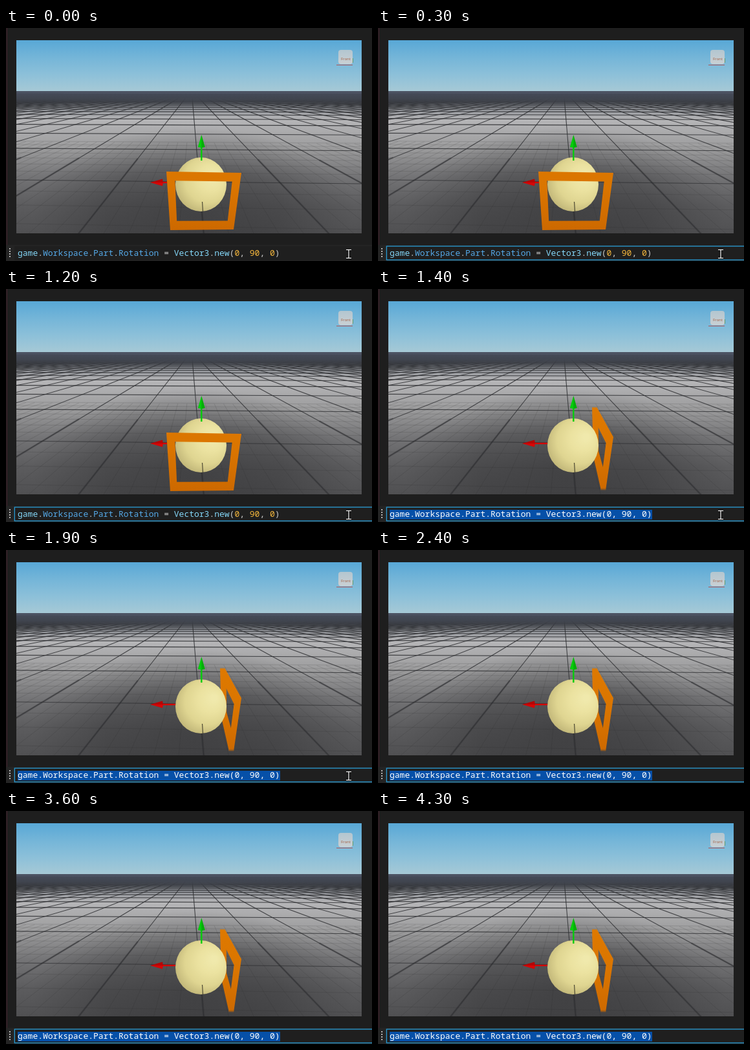
An HTML page with a canvas that plays this animation: 566x362 px, repeating every 4400 ms.

```html
<!DOCTYPE html>
<html>
<head>
<meta charset="utf-8">
<style>
html, body { margin: 0; width: 100%; height: 100%; overflow: hidden; background: #1e1e1e; }
canvas { display: block; }
</style>
</head>
<body>
<canvas id="stage" width="566" height="362"></canvas>
<script>
const LOOP = 4400, FOCUS_AT = 300, RUN_AT = 1300, POINTER_GONE_AT = 2000;
const VIEW = { left: 16, top: 19, width: 534, height: 300 };
const HORIZON = 98, BOTTOM = VIEW.top + VIEW.height;
const ctx = document.getElementById('stage').getContext('2d');

function fill(style, x, y, w, h) {
  ctx.fillStyle = style;
  ctx.fillRect(x, y, w, h);
}

function trace(points) {
  ctx.beginPath();
  points.forEach(([x, y]) => ctx.lineTo(x, y));
}

function poly(style, ...points) {
  trace(points);
  ctx.fillStyle = style;
  ctx.fill();
}

function line(style, width, ...points) {
  trace(points);
  ctx.strokeStyle = style;
  ctx.lineWidth = width;
  ctx.stroke();
}

// Colour stops are spread evenly
function blend(gradient, colors) {
  colors.forEach((color, i) => gradient.addColorStop(i / (colors.length - 1), color));
  return gradient;
}

function vertical(top, bottom, ...colors) {
  return blend(ctx.createLinearGradient(0, top, 0, bottom), colors);
}

function band(top, bottom, ...colors) {
  fill(vertical(top, bottom, ...colors), VIEW.left, top, VIEW.width, bottom - top);
}

// Camera one unit above the ground, tilted down and turned slightly left
const FOCAL = 214, PITCH = Math.atan(72 / FOCAL), YAW = 0.0178;
const CELL = 0.918, GRID_X = 0.095, GRID_Z = 1.341, SUBDIVISIONS = 5;

function project(x, z) {
  const side = x * Math.cos(YAW) + z * Math.sin(YAW);
  const ahead = z * Math.cos(YAW) - x * Math.sin(YAW);
  const depth = ahead * Math.cos(PITCH) + Math.sin(PITCH);
  const down = Math.cos(PITCH) - ahead * Math.sin(PITCH);
  return [283 + FOCAL * side / depth, 169 + FOCAL * down / depth];
}

function gridAcross(z, style, width) {
  const reach = z * 1.6 + 1.5;
  line(style, width, project(-reach, z), project(reach, z));
}

function gridAlong(x, far, style, width) {
  const near = Math.max(0.35, Math.abs(x) * 0.5);
  if (near < far) line(style, width, project(x, near), project(x, far));
}

function drawGround() {
  band(HORIZON, BOTTOM, '#545b66', '#b6b6b8', '#9c9c9d', '#747476', '#5c5c5e', '#505052');

  ctx.save();
  ctx.translate(290, 280);
  ctx.scale(2, 1);
  const shadow = ctx.createRadialGradient(0, 0, 10, 0, 0, 125);
  fill(blend(shadow, ['rgba(48,48,50,.55)', 'rgba(48,48,50,.4)', 'rgba(48,48,50,0)']), -140, -125, 280, 250);
  ctx.restore();

  const major = vertical(150, BOTTOM, 'rgba(40,41,44,.85)', 'rgba(40,41,44,.6)', 'rgba(40,41,44,.4)');
  const minor = 'rgba(35,35,37,.15)';
  for (let i = -25; i <= 25; i++) {
    const offset = i * CELL / SUBDIVISIONS;
    gridAlong(GRID_X + offset, 2.6, minor, 1);
    if (offset > -0.8 && offset < 1.3) gridAcross(GRID_Z + offset, minor, 1);
  }
  for (let i = -60; i <= 60; i++) {
    const x = GRID_X + i * CELL;
    gridAlong(x, 1.9, 'rgba(40,41,44,.3)', 3);
    gridAlong(x, 45, major, 1.1);
  }
  for (let i = 0; i < 45; i++) gridAcross(GRID_Z + i * CELL, major, 1.1);

  band(HORIZON, HORIZON + 24, 'rgba(74,81,98,.9)', 'rgba(74,80,93,.7)', 'rgba(80,84,92,0)');
}

function drawViewCube() {
  line('#ad5557', 1, [511, 57.5], [536, 57.5]);
  line('#5d9c72', 1, [536.5, 47], [536.5, 54]);
  ctx.fillStyle = vertical(34, 57, '#b3c6d0', '#cbd0d3');
  ctx.beginPath();
  ctx.roundRect(514, 34, 22, 22, 4);
  ctx.fill();
  ctx.font = '6px "Noto Sans", sans-serif';
  ctx.fillStyle = '#a5654a';
  ctx.fillText('Front', 518, 50);
}

function drawSphere() {
  const shade = ctx.createRadialGradient(322, 230, 4, 308, 238, 52);
  ctx.fillStyle = blend(shade, ['#f0e9ac', '#ebe2a0', '#dfd591', '#bdb275']);
  ctx.beginPath();
  ctx.ellipse(301.5, 243, 39.5, 42, 0, 0, 7);
  ctx.fill();
  line('#4d4933', 1.2, [303.5, 270], [304.5, 285]);
}

function mix(a, b, amount) {
  return a.map((value, i) => value + (b[i] - value) * amount);
}

// Four bars around a hole, swept sideways by the given thickness
function drawFrame([topLeft, topRight, bottomRight, bottomLeft], insetX, insetY, thickness) {
  const at = (u, v) => mix(mix(topLeft, topRight, u), mix(bottomLeft, bottomRight, u), v);
  const ring = (u, v) => [at(u, v), at(1 - u, v), at(1 - u, 1 - v), at(u, 1 - v)];
  const outer = ring(0, 0), inner = ring(insetX, insetY);
  ctx.fillStyle = vertical(183, 313, '#de7900', '#da7500', '#cd6900');
  for (let shift = 0; shift <= thickness; shift++) {
    ctx.beginPath();
    for (const corners of [outer, inner]) {
      corners.forEach(([x, y], i) => ctx[i ? 'lineTo' : 'moveTo'](x - shift, y));
      ctx.closePath();
    }
    ctx.fill('evenodd');
  }
}

const drawFrontFrame = () => drawFrame([[248, 223], [364, 225], [352, 313], [254, 314]], 0.11, 0.155, 0);
const drawSideFrame = () => drawFrame([[338, 183], [364, 230], [352, 313], [340, 260]], 0.1, 0.17, 7);

function drawArrow(x, y, angle, color, length) {
  ctx.save();
  ctx.translate(x, y);
  ctx.rotate(angle);
  fill(color, 18, -1.2, length - 18, 2.4);
  poly(color, [0, 0], [19, -5.5], [20, 0], [19, 5.5]);
  poly('rgba(0,0,0,.15)', [0, 0], [20, 0], [19, -5.5]);
  ctx.restore();
}

function drawScene(rotated) {
  ctx.save();
  ctx.beginPath();
  ctx.rect(VIEW.left, VIEW.top, VIEW.width, VIEW.height);
  ctx.clip();
  band(VIEW.top, HORIZON, '#58a8d6', '#74b5d8', '#8cc0d9', '#a6c9d6');
  drawGround();
  drawViewCube();
  if (rotated) drawSideFrame();
  drawSphere();
  if (!rotated) drawFrontFrame();
  drawArrow(223, 240, 0, '#d60606', rotated ? 39 : 26);
  drawArrow(302.3, 166, Math.PI / 2, '#06cd0b', 40);
  ctx.restore();
}

const COMMAND = 'game.Workspace.Part.Rotation = Vector3.new(0, 90, 0)';

function tokenColor(token) {
  if (/^\d/.test(token)) return '#f6b73c';
  if (/^(game|Vector3|new)$/.test(token)) return '#84d6f7';
  return /^\w/.test(token) ? '#55a9e8' : '#cccccc';
}

function drawCommandBar(focused, selected) {
  fill('#242424', 0, 337, 566, 25);
  fill('#1f1f1f', 13, 339, 553, 22);
  for (let y = 342; y < 357; y += 4) fill('#b5b5b5', 5, y, 2, 2);
  if (focused) {
    ctx.strokeStyle = '#289bd3';
    ctx.lineWidth = 1.3;
    ctx.strokeRect(13.3, 339, 560, 21.3);
  }
  if (selected) fill('#0650a8', 18, 343, 406, 15);
  ctx.font = '13px "Noto Sans Mono", monospace';
  let x = 18;
  for (const token of COMMAND.match(/\w+|\W+/g)) {
    ctx.fillStyle = selected ? '#ffffff' : tokenColor(token);
    ctx.fillText(token, x, 354);
    x += ctx.measureText(token).width;
  }
}

function drawPointer() {
  for (const [color, width] of [['#080808', 3.5], ['#f2f2f2', 1.3]]) {
    line(color, width, [530, 345], [530, 357]);
    for (const y of [344.5, 357.5]) line(color, width, [526, y], [534, y]);
  }
}

let shown;
function render(now) {
  const t = now % LOOP;
  const phase = [FOCUS_AT, RUN_AT, POINTER_GONE_AT].filter(start => t >= start).length;
  if (phase !== shown) {
    shown = phase;
    fill('#1e1e1e', 0, 0, 566, 362);
    fill('#42202c', 1, 0, 1, 337);
    drawScene(phase >= 2);
    drawCommandBar(phase >= 1, phase >= 2);
    if (phase < 3) drawPointer();
  }
  requestAnimationFrame(render);
}
render(0);
</script>
</body>
</html>
```
